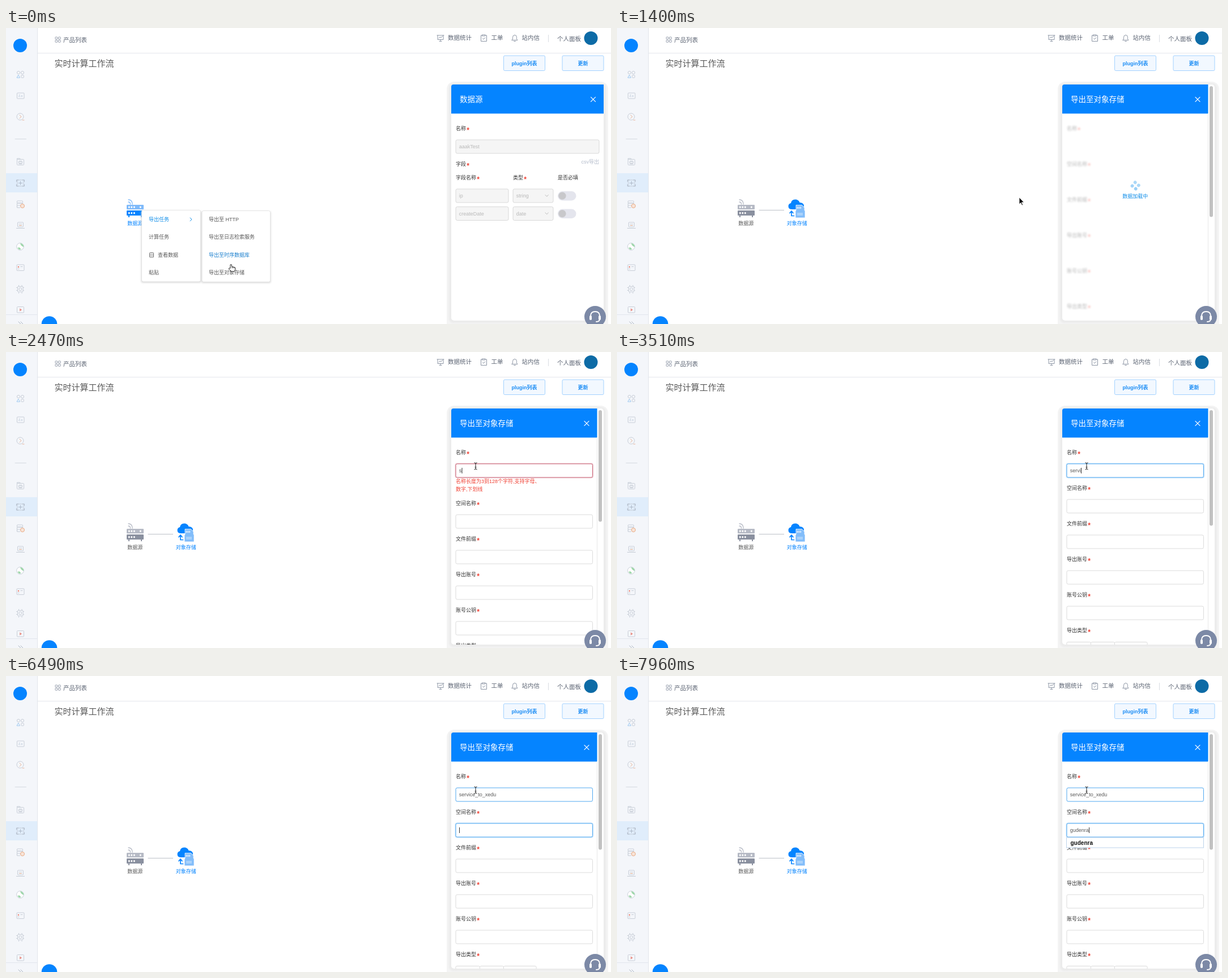
An HTML page for the animation above (8 s loop, 1068x524 px).

```html
<!DOCTYPE html>
<html lang="zh-CN">
<head>
<meta charset="utf-8">
<title>实时计算工作流</title>
<style>
  html, body { margin: 0; width: 100%; height: 100%; overflow: hidden; background: #fff; }
  svg { display: block; width: 100%; height: 100%; }
  text { font-family: "Liberation Sans", "Noto Sans CJK SC", "Noto Sans CJK", sans-serif; white-space: pre; }
</style>
</head>
<body>
<svg viewBox="0 0 1068 524">
  <defs>
    <clipPath id="body"><path d="M786 151H1043.5V518H786z"/></clipPath>
    <filter id="blur" x="-20%" y="-20%" width="140%" height="140%"><feGaussianBlur stdDeviation="1.8"/></filter>
    <filter id="soft" x="-10%" y="-10%" width="120%" height="120%"><feGaussianBlur stdDeviation="1.5"/></filter>
  </defs>
  <g id="chrome"></g>
  <g id="stage"></g>
  <g id="overlay"></g>
</svg>
<script>
const LOOP = 8000, BLUE = '#0584ff', GREY = '#595959', FONT = '9px "Liberation Sans", sans-serif';
const SERVICE = 'service_to_xedu', BUCKET = 'gudenra';
const LOADED = 1430, FOCUS_2 = 6340;

// Every moment at which the picture changes
const ticks = [0, 150, 360, 660, 810, 960, 1110, 1270, 1430, 1580, 1720, 1870, 2020, 2170, 2320, 2470,
  2770, 2910, 3210, 3510, 3810, 4410, 4710, 4860, 5160, 5460, 5600, 5750, 5900, 6340, 6490, 6790,
  7230, 7380, 7520, 7670, 7820, 7960];

// [time, number of typed characters]
const typing1 = [[0, 0], [2470, 1], [2770, 2], [2910, 3], [3510, 5], [3810, 7], [4410, 8], [4710, 9],
  [4860, 10], [5160, 11], [5460, 12], [5600, 13], [5750, 14], [5900, 15]];
const typing2 = [[0, 0], [7230, 1], [7380, 2], [7520, 3], [7670, 4], [7820, 6], [7960, 7]];

// [time, shape, x, y]
const pointer = [[0, 'hand', 392.5, 418], [150, 'hand', 394, 425], [360, 'hand', 395, 431.5],
  [960, 'arrow', 470, 405], [1110, 'arrow', 590, 355], [1270, 'arrow', 710, 300], [1430, 'arrow', 795, 250],
  [1580, 'arrow', 818, 228], [1720, 'beam', 826, 208], [1870, 'beam', 829, 202]];

const latest = (keys, t) => keys.findLast(k => k[0] <= t);
const between = (t, a, b) => t >= a && t < b;
const lerp = (a, b, k) => a + (b - a) * Math.min(1, Math.max(0, k));

const ruler = document.createElement('canvas').getContext('2d');
const textWidth = s => { ruler.font = FONT; return ruler.measureText(s).width; };

const text = (x, y, s, fill = GREY, size = 9, extra = '') =>
  `<text x="${x}" y="${y}" fill="${fill}" font-size="${size}" ${extra}>${s}</text>`;
const centered = (x, y, s, fill, size, extra = '') => text(x, y, s, fill, size, `text-anchor="middle" ${extra}`);
const rect = (x, y, w, h, fill, rx = 0, extra = '') =>
  `<rect x="${x}" y="${y}" width="${w}" height="${h}" rx="${rx}" fill="${fill}" ${extra}/>`;
const circle = (x, y, r, fill, extra = '') => `<circle cx="${x}" cy="${y}" r="${r}" fill="${fill}" ${extra}/>`;
const line = (d, stroke, w = 1, fill = 'none') =>
  `<path d="${d}" stroke="${stroke}" stroke-width="${w}" fill="${fill}" stroke-linecap="round" stroke-linejoin="round"/>`;
const at = (x, y, s) => `<g transform="translate(${x} ${y})">${s}</g>`;

function label(x, y, s, required = true) {
  const star = text(x + s.length * 9 + 1.3, y + 7, '*', '#f04134', 12, 'font-weight="700"');
  return text(x, y + 3.3, s, '#333', 9, 'font-weight="500"') + (required ? star : '');
}

function input(x, y, w, { value = '', border = '#d5d5d5', glow = 0, disabled = false, caret = false } = {}) {
  const halo = glow ? rect(x - .7, y - .7, w + 1.4, 25.4, 'none', 3, `stroke="${border}" stroke-width="1.6" opacity="${glow * .25}"`) : '';
  return halo + rect(x, y, w, 24, disabled ? '#f5f5f5' : '#fff', 2.5, `stroke="${border}" stroke-width=".85"`) +
    text(x + 5.7, y + 15, value, disabled ? '#b9b9b9' : GREY) +
    (caret ? rect(x + 6 + textWidth(value), y + 7, 1, 10, '#333') : '');
}

function sidebar() {
  const c = '#c3cad4', box = (x, y, w, h) => rect(x, y, w, h, 'none', 1, `stroke="${c}" stroke-width=".9"`);
  const ring = (x, y, r, fill = 'none') => circle(x, y, r, fill, `stroke="${c}" stroke-width=".9"`);
  const lines = (x, y, w) => line(`M${x} ${y}h${w}m0 2.5h${-w}`, c, .8);
  return rect(0, 0, 55, 524, '#f4f6fa') + rect(55, 0, 1, 524, '#e2e6ec') + rect(0, 257, 55, 34, '#e0edfb') +
    circle(25, 31, 12, BLUE) +
    ring(22, 79, 2.6) + ring(29, 79, 2.6) + line('M22 83.5l2.6 4.5h-5.2z', '#9cc8f0') + box(26.8, 83.5, 4.5, 4.5) +
    box(19.5, 115, 12.5, 10) + text(22, 122, 'Z.o', '#a9bbcf', 5) +
    ring(25, 157, 6) + line('M24 154l3 3-3 3m5 3h3', '#e8b49a') +
    line('M16 196.5h19.5', '#d5dae1') +
    box(19.5, 232.5, 12, 10) + line('M19.5 232.5v-1.5h5l1 1.5', c) + box(22.5, 235.5, 6, 5) + lines(23.5, 237, 4) +
    box(20, 269, 11, 11) + line('M22.5 274.5h6m-3-3v6M18.5 272v-3h3m8 0h3v3m0 5v3h-3m-8 0h-3v-3', '#aab5c3', .9) +
    box(19.5, 306, 10, 4) + box(19.5, 310, 10, 4) + line('M19.5 314v4h5', c) + circle(29, 315, 3.5, '#f8e4d8', 'stroke="#e8ab85"') +
    box(20.5, 344, 10, 8) + line('M18.5 354.5h14', c) + lines(23, 347, 5) + line('M24 349.5h3', '#e8ab85') +
    ring(25, 387, 6.3, '#fff') + line('M26 381.5q4.5 1 5 5.5l-2.5-1-2-2zm-5 8l2 2.5 3-.5-2-2.5z', '#9bd6a8', .8, '#9bd6a8') +
    box(19, 419, 13, 10.5) + circle(22, 423, 1.2, '#ea7c6d') + line('M21 426.5h2m3-4h3', c) +
    box(20.5, 457.5, 9.5, 9.5) + box(23, 460, 4.5, 4.5) +
    line('M22.5 455.5v1m5.5 0v-1m-5.5 14v-1m5.5 0v1m-9.5-10h1m-1 5h1m12-5h-1m1 5h-1', c) +
    box(19.5, 493.5, 12, 10.5) + line('M24.5 497v4l3-2z', '#e88478', .5, '#e88478') +
    line('M0 507.5h55', '#e2e6ec') + line('M22 520l4 4-4 4m4-8l4 4-4 4', '#aab3bf');
}

function topBar() {
  const c = '#8d96a5', word = '#5c6473';
  const button = (x, s) => rect(x, 49, 73, 26.5, '#f2f8ff', 2, 'stroke="#94caff" stroke-width=".85"') +
    centered(x + 36.5, 65.5, s, '#1a8cf5', 9, 'font-weight="600"');
  const tiles = [[87, 16], [92.5, 16], [87, 21.5], [92.5, 21.5]]
    .map(([x, y]) => rect(x, y, 3.7, 3.7, 'none', .5, `stroke="${c}" stroke-width=".9"`)).join('');
  return rect(56, 44, 1012, 1, '#e4e7ec') + tiles + text(101, 24.5, '产品列表', word, 10.5) +
    text(85.5, 67.5, '实时计算工作流', GREY, 15) +
    line('M761 13h12m-11 0v7.5h10V13m-8 5l2-2 2 1 2.5-2.5M767 20.5v2m-2 1h4', c) + text(780, 21.3, '数据统计', word, 10.5) +
    line('M841 13h-2.5v10.5h10V13H846m-5-1h5v2h-5zm.5 6.5l1.5 1.5 3-3', c) + text(856.5, 21.3, '工单', word, 10.5) +
    line('M893 21.5h10l-1.5-2v-3q0-4-3.5-4t-3.5 4v3zm3.5 2h3', c) + text(910.5, 21.3, '站内信', word, 10.5) +
    rect(957, 12, 1, 13, '#d9dde3') + text(973, 22.5, '个人面板', word, 10.5) + circle(1032.5, 18, 12, '#0d6ba6') +
    button(878.5, 'plugin列表') + button(982, '更新');
}

function sourceNode(selected) {
  const [light, dark, word] = selected ? ['#7fbafa', BLUE, BLUE] : ['#b6bac5', '#8a909f', GREY];
  const dots = (y, xs) => xs.map(x => rect(x, y, 2.6, 3.2, '#fff', 1)).join('');
  return line('M216 304q7 0 7 8M216 308q3.5 0 3.5 4', light, 1.3) +
    rect(213, 313, 30, 8.3, light, 1) + dots(315.5, [216, 220.5, 225, 236]) +
    rect(213, 323, 30, 9, dark, 1) + dots(326, [216, 220.5, 225]) +
    rect(216, 332, 2, 3, dark) + rect(238, 332, 2, 3, dark) + centered(227.7, 349.3, '数据源', word, 9);
}

function storageNode() {
  const card = '#82bdfa';
  return `<path d="M308 321q-5.5-.5-5.5-5.5 0-4.5 4.500-5.5 1-6.500 7.500-6.500 6 0 8 5.500 7.500 0 7.500 6.500 0 5-4.500 5.500z" fill="${BLUE}"/>` +
    `<path d="M315 336v-13h1v-9.500h10.5l4.500 4.500v5h1v13z" fill="${card}" stroke="#fff" stroke-width=".8"/>` +
    line('M318.5 317v2.500m2.800-2.500v2.500m2.800-2.500v2.500', '#fff', 1.3) + rect(318, 327, 10, 5, '#a9d2fb') +
    line('M308 325v7.500h4.500m-7.500-5l3-3.500 3 3.500', BLUE, 1.7) + centered(317.7, 349.3, '对象存储', BLUE, 9);
}

function menus(t) {
  const card = (x, y, w, h) => rect(x - 1, y + 1, w + 2, h + 1, '#ccc', 3, 'filter="url(#soft)" opacity=".7"') +
    rect(x, y, w, h, '#fff', 3, 'stroke="#e0e0e0" stroke-width=".8"');
  const row = i => 341.8 + 31.5 * i, hovered = t < 150 ? 2 : 3;
  return card(239.5, 322.5, 104, 126.5) + card(346, 323.5, 120.5, 126) +
    text(252, row(0), '导出任务', '#108ee9') + line('M325 336l3 2.8-3 2.8', '#108ee9') +
    text(252, row(1), '计算任务') + text(268, row(2), '查看数据') + text(252, row(3), '粘贴') +
    rect(253.5, 397.5, 7, 8.5, 'none', 1, 'stroke="#777"') + line('M253.5 400.3h7m-7 3h7', '#777', .9) +
    ['导出至 HTTP', '导出至日志检索服务', '导出至时序数据库', '导出至对象存储']
      .map((s, i) => text(358, row(i), s, i === hovered ? '#1a7fce' : GREY)).join('');
}

function panelFrame(title, width) {
  const x = 786 + width - 18.5;
  return rect(778, 95, 285, 450, '#f4f4f4', 13) + rect(782, 98, 277, 424, '#ebebeb', 8, 'filter="url(#soft)"') +
    rect(786, 100, 269, 418, '#fff', 5) +
    `<path d="M786 151.5V104q0-4 4-4h${width - 4}v51.5z" fill="${BLUE}"/>` +
    text(801, 131.3, title, '#fff', 13.5, 'font-weight="500"') +
    line(`M${x - 4} 122.3l8 8m0-8l-8 8`, '#fff', 1.2);
}

function sourcePanel() {
  const off = { disabled: true, border: '#d3d3d3' };
  const field = (y, name, type) => input(794, y, 93, { ...off, value: name }) + input(895, y, 71, { ...off, value: type }) +
    line(`M952 ${y + 10.5}l2.7 2.7 2.7-2.7`, '#bbb') +
    rect(974, y + 4, 32.5, 16.5, '#e4e5ed', 8.2) + circle(982, y + 12.2, 6.6, '#c8c8cb');
  return panelFrame('数据源', 269) + label(794, 178, '名称') + input(794, 198, 253, { ...off, value: 'aaakTest' }) +
    text(1047, 239.5, 'csv导出', '#b4bccb', 9, 'text-anchor="end"') + label(794, 241, '字段') +
    label(794, 265, '字段名称') + label(895, 265, '类型') + label(974, 265, '是否必填', false) +
    field(285, 'ip', 'string') + field(316.5, 'createDate', 'date');
}

function spinner(t) {
  const turn = (t - 810) / 1200 * 360 - 8;
  const dots = [[-4, -4, .35], [4, -4, .42], [4, 4, .38], [-4, 4, .35]]
    .map(([x, y, o]) => circle(x, y, 2.9, '#108ee9', `opacity="${o}"`)).join('');
  return at(915.2, 279, `<g transform="rotate(${turn})">${dots}</g>`) + centered(914.7, 300.5, '数据加载中', '#108ee9', 9);
}

function exportPanel(t) {
  const loading = t < LOADED, SHIFT = 27;
  const error1 = between(t, 2470, 2910), error2 = between(t, 7230, 7520);
  const name = SERVICE.slice(0, latest(typing1, t)[1]), bucket = BUCKET.slice(0, latest(typing2, t)[1]);
  const red = '#c0495f', focus = '#3099ee';
  const glow1 = t < FOCUS_2 ? lerp(0, 1, (t - 1720) / 300) : 0, glow2 = lerp(0, 1, (t - 6190) / 300);
  const state = [
    { value: name, glow: glow1, border: error1 ? red : t >= 1720 ? focus : undefined,
      caret: between(t, 2020, FOCUS_2) && !between(t, 2320, 2470) && !between(t, 3210, 3510) },
    { value: bucket, glow: t < FOCUS_2 ? 0 : glow2, border: error2 ? red : t >= FOCUS_2 ? focus : undefined,
      caret: t >= 6490 && !between(t, 6790, 7230) },
  ];
  const error = (y, first, second) => text(794, y, first, '#f04134') + text(794, y + 13.5, second, '#f04134');
  const rows = ['名称', '空间名称', '文件前缀', '导出账号', '账号公钥', '导出类型'].map((s, i) => {
    const y = 178 + 63 * i + (error1 && i > 0 || error2 && i > 1 ? SHIFT : 0);
    const choices = [[794, 42.5], [836.5, 42], [878.5, 57.5]]
      .map(([x, w]) => rect(x, y + 20.5, w, 24, '#fff', 2, 'stroke="#d5d5d5" stroke-width=".85"')).join('');
    return label(794, y, s) + (loading ? '' : i === 5 ? choices : input(794, y + 20, 241.5, state[i]));
  }).join('');
  const errors = (error1 ? error(232, '名称长度为3到128个字符,支持字母、', '数字,下划线') : '') +
    (error2 ? error(295, '名称长度为3到63个字符,支持小写字母、', '数字,中划线') : '');
  const suggestion = t >= 7230 ? rect(793.5, 286, 242, 18, '#fff', 0, 'stroke="#b5cfe8" stroke-width=".9"') +
    text(800.5, 298.6, BUCKET, '#111', 10, 'font-weight="700"') : '';
  const thumb = loading ? 231.5 : error1 || error2 ? 197.5 : 204.5;
  return panelFrame('导出至对象存储', 257.5) + rect(1043, 151, 1, 367, '#e8e8e8') +
    rect(1046, 103, 6, thumb, '#c1c1c1', 3) +
    `<g clip-path="url(#body)"><g ${loading ? 'filter="url(#blur)" opacity=".35"' : ''}>${rows}</g>${errors}${suggestion}</g>` +
    (loading ? spinner(t) : '');
}

function graph(t) {
  const k = (t - 810) / 450;
  const link = t < 810 ? '' : rect(lerp(247, 250.5, k), 322, lerp(11, 44.5, k), 1, '#bcc0c8');
  return sourceNode(t < 660) + link + (t >= 1110 ? storageNode() : '');
}

const shapes = {
  hand: line('M3.5 7V2q0-1.5 1.2-1.5T5.900 2l.6 3q1.3-.7 2 .2 1.300-.5 1.900.4 1.800-.2 1.900 1.600 0 3.200-1.500 5.800H5.500L.8 8.500q-.5-1.500 1-1.500z', '#222', 1, '#fff') +
    line('M6.5 5v2m2-1.800v1.800m2-1.400v1.400', '#222', .7),
  arrow: line('M0 0v12l2.8-2.5 2 4.5 1.8-.8-2-4.4h3.7z', '#fff', .8, '#111'),
  beam: line('M-2.2-6q2.2 0 2.2 1.5v9q0 1.5-2.2 1.5m4.4-12q-2.2 0-2.2 1.5m0 9q0 1.5 2.2 1.5M-1 2h2', '#222', 1),
};

function scene(t) {
  const [, shape, x, y] = latest(pointer, t);
  return graph(t) + (t < 660 ? menus(t) + sourcePanel() : exportPanel(t)) + at(x, y, shapes[shape]);
}

const byId = id => document.getElementById(id);
byId('chrome').innerHTML = sidebar() + topBar() + circle(76.5, 524, 13.8, BLUE);
byId('overlay').innerHTML = circle(1040, 511, 19, '#7c89a6') +
  line('M1032 512v-2q0-8 8-8t8 8v2m0 3q0 5-6 5', '#fff', 1.8) +
  rect(1030, 509, 4, 8, '#fff', 1.8) + rect(1046, 509, 4, 8, '#fff', 1.8);

let shown = -1;
function frame() {
  const now = performance.now() % LOOP, t = ticks.findLast(k => k <= now);
  if (t !== shown) byId('stage').innerHTML = scene(shown = t);
  requestAnimationFrame(frame);
}
frame();
</script>
</body>
</html>
```
